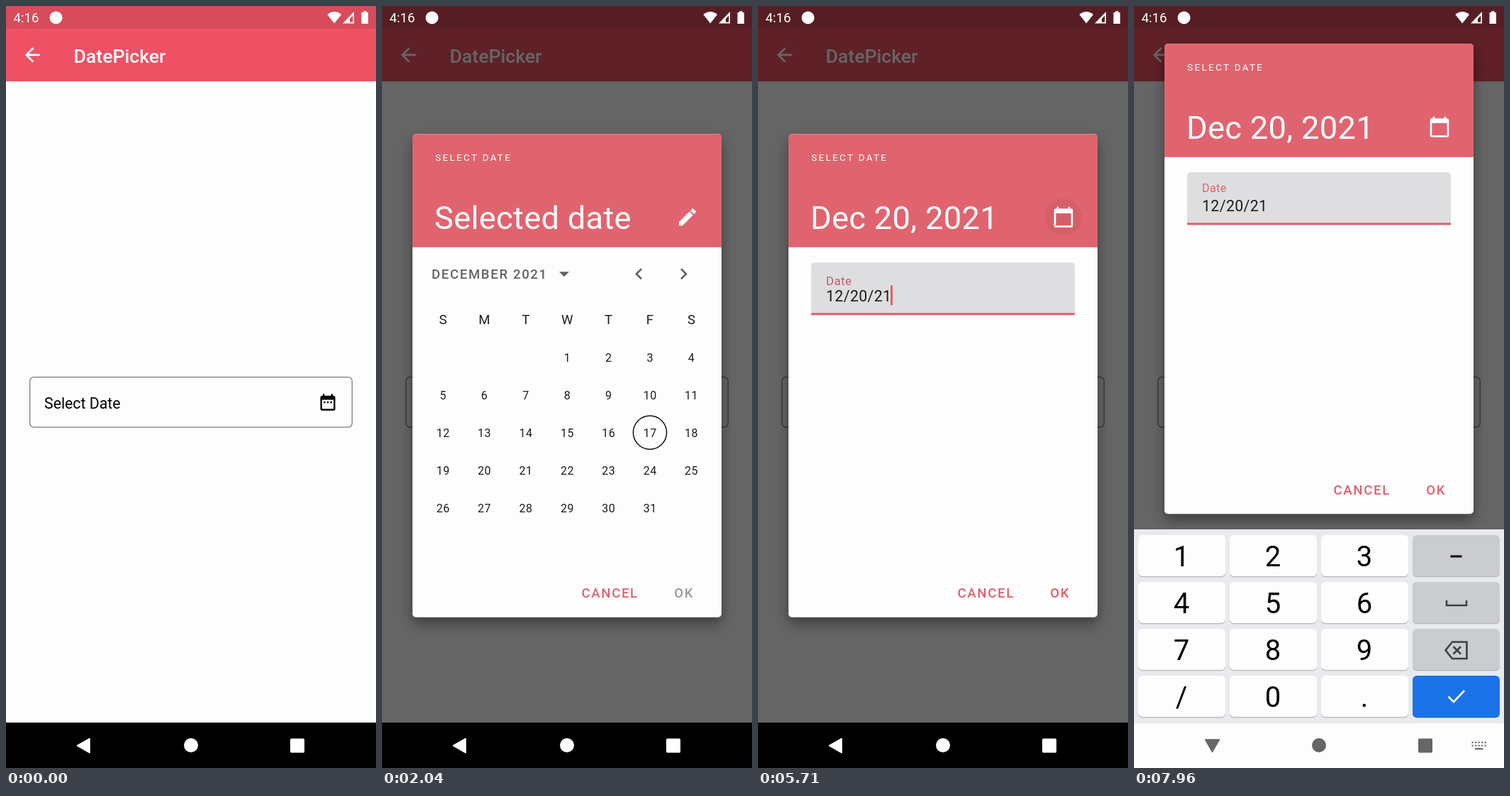
An HTML page that plays this animation: 522x1073 px, repeating every 8000 ms.

```html
<!DOCTYPE html>
<html lang="en">
<head>
<meta charset="utf-8">
<title>DatePicker</title>
<style>
html, body { margin: 0; width: 100%; height: 100%; overflow: hidden; background: #000 }
svg { display: block; width: 522px; height: 1073px; font-family: Roboto, sans-serif }
.mid { text-anchor: middle }
.btn { font-size: 18.6px; font-weight: 500; letter-spacing: 1.66px }
.title { font-size: 45.2px; letter-spacing: .33px }
.pink { fill: #e0606e }
.line { fill: none; stroke-width: 2.6 }
#card { filter: drop-shadow(0 9px 9px rgba(0,0,0,.38)) }
</style>
</head>
<body>
<svg viewBox="0 0 522 1073">
  <defs>
    <path id="back" d="M20 11H7.83l5.59-5.59L12 4l-8 8 8 8 1.41-1.41L7.83 13H20z"/>
    <path id="pencil" d="M3 17.25V21h3.75L17.81 9.94l-3.75-3.75zM20.71 7.04c.39-.39.39-1.02 0-1.41l-2.34-2.34c-.39-.39-1.02-.39-1.41 0l-1.83 1.83 3.75 3.75z"/>
    <path id="calendar" d="M20 3h-1V1h-2v2H7V1H5v2H4c-1.1 0-2 .9-2 2v16c0 1.1.9 2 2 2h16c1.1 0 2-.9 2-2V5c0-1.1-.9-2-2-2zm0 18H4V8h16z"/>
    <path id="range" d="M9 11H7v2h2zm4 0h-2v2h2zm4 0h-2v2h2zm2-7h-1V2h-2v2H8V2H6v2H5c-1.1 0-2 .9-2 2v14c0 1.1.9 2 2 2h14c1.1 0 2-.9 2-2V6c0-1.1-.9-2-2-2zm0 16H5V9h14z"/>
  </defs>

  <rect width="522" height="1073" fill="#fdfdfd"/>
  <rect y="106" width="522" height="2" fill="#000" opacity=".06"/>
  <rect width="522" height="106" fill="#ee5163"/>
  <rect width="522" height="32" fill="#d74b5a"/>
  <use href="#back" transform="translate(21.5 53) scale(1.329)" fill="#fff"/>
  <text x="95.5" y="79.5" font-size="26.6" font-weight="500" fill="#fff">DatePicker</text>
  <rect x="33.7" y="522.7" width="454.6" height="70.4" rx="5.5" fill="#fdfdfd"/>
  <rect id="press" x="33.7" y="522.7" width="454.6" height="70.4" rx="5.5"/>
  <rect x="33.7" y="522.7" width="454.6" height="70.4" rx="5.5" fill="none" stroke="#7c7c80" stroke-width="1.3"/>
  <text x="54" y="566.5" font-size="21.27">Select Date</text>
  <use href="#range" transform="translate(440 544) scale(1.167)"/>

  <rect id="dim" width="522" height="1073"/>
  <g fill="#fff">
    <text x="10.5" y="23" font-size="18.6">4:16</text>
    <circle cx="70.5" cy="16.5" r="9"/>
    <path d="M463.2 24.5L453.3 12Q463.2 4 473.1 12z"/>
    <path fill-rule="evenodd" d="M491 8V24.5H475zM489.3 13.5L485 18V22.8H489.3z"/>
    <path d="M504 9V7.2h4.5V9h2.5V25h-9.5V9z"/>
  </g>
  <rect y="1009" width="522" height="64"/>

  <g id="dialog">
    <rect id="card" width="436" rx="5" fill="#fdfdfd"/>
    <path d="M0 159.5V5Q0 0 5 0H431Q436 0 436 5V159.5z" fill="#e0646f"/>
    <g fill="#fff">
      <text x="32.3" y="37.5" font-size="13.3" letter-spacing="2.4">SELECT DATE</text>
      <text id="headline" class="title" x="31" y="133.5"></text>
      <circle id="tap" cx="388" cy="117" fill="#000"/>
      <use id="mode" transform="translate(372 101) scale(1.329)"/>
    </g>
    <g id="month">
      <text class="btn" x="27" y="204" fill="#636363">DECEMBER 2021</text>
      <g fill="#636363">
        <path d="M207 194h14l-7 7z"/>
        <path d="M15.41 7.41L14 6l-6 6 6 6 1.41-1.41L10.83 12z" transform="translate(303.4 181) scale(1.329)"/>
        <path d="M10 6L8.59 7.41 13.17 12l-4.58 4.59L10 18l6-6z" transform="translate(366.6 181) scale(1.329)"/>
      </g>
      <circle cx="335" cy="420.3" r="23.6" fill="none" stroke="#111" stroke-width="1.5"/>
      <circle id="chosen" class="pink" cx="101.4" cy="473.7" r="23.6"/>
      <circle id="ripple" opacity=".09"/>
      <g id="days" class="mid" fill="#1c1c1c"></g>
    </g>
    <g id="entry">
      <path d="M32 255V186Q32 181 37 181H399Q404 181 404 186V255z" fill="#dedee1"/>
      <rect class="pink" x="32" y="252" width="372" height="3"/>
      <text id="label" x="53" letter-spacing=".4">Date</text>
      <text x="53" y="235.5" font-size="21.27" letter-spacing=".4" fill="#1c1c1c">12/20/21</text>
      <rect id="caret" class="pink" x="144" y="213" width="3" height="28"/>
    </g>
    <g id="actions" class="btn pink">
      <text x="238.5">CANCEL</text>
      <text id="ok" x="369.3">OK</text>
    </g>
  </g>

  <g id="board">
    <rect y="737" width="522" height="336" fill="#e8eaed"/>
    <rect y="1010" width="522" height="70" fill="#fdfdfd"/>
    <g id="keys" class="mid" font-size="40"></g>
    <rect x="446.5" y="773.5" width="16" height="3"/>
    <path class="line" stroke="#3c4043" d="M441 837v7h28v-7M449 895.5H469.5V919H449L439.5 907.2zM450.5 902l10.5 10.5M461 902l-10.5 10.5"/>
    <path class="line" stroke="#fff" d="M443.5 972.5l7.5 7.5 15-16"/>
  </g>

  <g id="nav">
    <path id="arrow" d="M118 1031.5V1051.5L100.5 1041.5z" stroke-width="1.5" stroke-linejoin="round"/>
    <circle cx="261" cy="1041" r="10"/>
    <rect x="401" y="1031.5" width="20" height="20" rx="1.5"/>
    <path id="dots" d="M476.5 1037H497M476.5 1041.5H497" stroke-width="2.2" stroke-dasharray="2.2 2.3" fill="none"/>
    <path id="bar" d="M481 1046H492.5" stroke-width="2.2"/>
  </g>
</svg>
<script>
const $ = id => document.getElementById(id);
const LOOP = 8000, PICK = 4540, ENTRY = 5590, BLINK = 6470;

const span = (t, from, to) => Math.min(1, Math.max(0, (t - from) / (to - from)));
const mix = (a, b, p) => a + (b - a) * p;
const easeOut = (p, n = 3) => 1 - (1 - p) ** n;
const smooth = p => p * p * (3 - 2 * p);
const set = (id, attrs) => { for (const k in attrs) $(id).setAttribute(k, attrs[k]); };
const show = (id, on) => set(id, { visibility: on ? 'visible' : 'hidden' });

// Calendar grid: December starts on a Wednesday
const colX = i => 43 + 58.4 * (i % 7);
let grid = [...'SMTWTFS'].map((d, i) =>
  `<text x="${colX(i)}" y="268" font-size="18.6">${d}</text>`).join('');
for (let d = 1; d <= 31; d++) {
  const cell = d + 2;
  grid += `<text id="day${d}" x="${colX(cell) + .2}" y="${320.3 + 53.2 * Math.floor(cell / 7)}"
    font-size="16" letter-spacing=".5">${d}</text>`;
}
$('days').innerHTML = grid;

// Number pad, the last column holds the function keys
$('keys').innerHTML = [...'123 456 789 /0. '].map((c, i) => {
  const x = 6 + 129 * (i % 4), y = 745 + 66 * Math.floor(i / 4);
  const fill = i == 15 ? '#1a73e8' : i % 4 == 3 ? '#cbccd0' : '#fdfdfd';
  const key = (dy, color) => `<rect x="${x}" y="${y + dy}" width="123" height="58" rx="6" fill="${color}"/>`;
  return key(1.2, i == 15 ? '#1967d2' : '#b4b6ba') + key(0, fill) +
    `<text x="${x + 61}" y="${y + 44}">${c}</text>`;
}).join('');

function draw(t) {
  const open = easeOut(span(t, 1850, 2050));
  const picked = t >= PICK, typing = t >= ENTRY;

  set('press', { opacity: .055 * span(t, 1500, 1600) * (1 - span(t, 1680, 1900)) });
  set('dim', { opacity: .6 * open });

  // Dialog opens, later rises above the keyboard
  const top = mix(180.3, 53.3, easeOut(span(t, 6350, 6600)));
  const height = mix(680.5, 662, span(t, 6470, 6500));
  const scale = mix(.9, 1, open);
  set('dialog', {
    opacity: open,
    transform: `translate(261 520) scale(${scale}) translate(-218 ${top - 520})`
  });
  set('card', { height });
  set('actions', { transform: `translate(0 ${height - 27.5})` });

  $('headline').textContent = picked ? 'Dec 20, 2021' : 'Selected date';
  set('mode', { href: typing ? '#calendar' : '#pencil' });
  set('tap', {
    r: mix(10, 26, easeOut(span(t, 5450, 5600))),
    opacity: .08 * span(t, 5450, 5520) * (1 - span(t, 5620, 5860))
  });
  set('ok', { fill: picked ? '#e0606e' : '#999' });

  // Month view
  $('month').style.display = typing ? 'none' : '';
  const spread = easeOut(span(t, 4400, PICK), 2);
  set('ripple', {
    cx: mix(94, 101.4, spread), cy: mix(456, 473.7, spread),
    r: t >= 4400 && !picked ? mix(8, 23.6, spread) : 0
  });
  $('chosen').style.display = picked ? '' : 'none';
  set('day20', { fill: picked ? '#fff' : '#1c1c1c' });

  // Text entry view
  $('entry').style.display = typing ? '' : 'none';
  const rise = span(t, ENTRY, 5757);
  set('label', {
    y: mix(224, 208.8, rise), 'font-size': mix(19, 16, rise),
    fill: `rgb(${mix(100, 224, rise)},${mix(90, 96, rise)},${mix(95, 110, rise)})`
  });
  const lit = t < BLINK ? (t - ENTRY) % 1000 < 500 : (t - BLINK) % 1000 < 480;
  $('caret').style.display = lit ? '' : 'none';

  // Keyboard and navigation bar
  const slide = easeOut(span(t, 6230, 6540));
  show('board', t >= 6230);
  set('board', { transform: `translate(0 ${336 * (1 - slide)})` });
  const tint = span(t, 6320, 6500), grey = mix(255, 102, tint);
  const color = `rgb(${grey},${grey},${grey})`;
  set('nav', { fill: color, stroke: 'none' });
  set('arrow', { stroke: color, transform: `rotate(${-90 * smooth(span(t, 6420, 6620))} 110 1041)` });
  for (const id of ['dots', 'bar']) set(id, { stroke: color, opacity: tint });
}

function frame() {
  draw(performance.now() % LOOP);
  requestAnimationFrame(frame);
}
frame();
</script>
</body>
</html>
```
